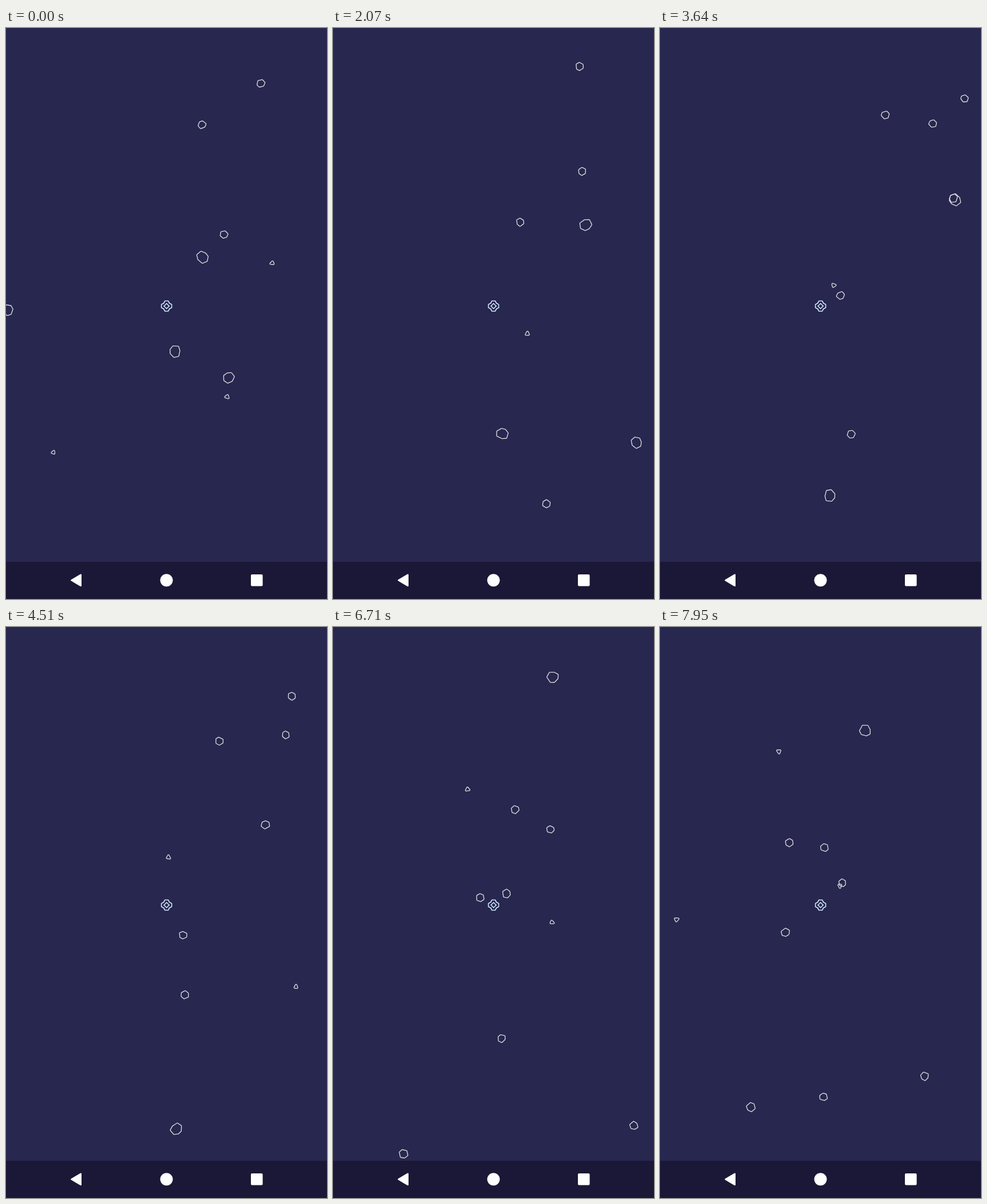
Write an HTML page with a canvas that moves like this. It is 561 px wide and 998 px high and loops after 8 s.

```html
<!DOCTYPE html>
<html lang="en">
<head>
<meta charset="utf-8">
<title>Drifting rocks</title>
<style>
  html, body { margin: 0; width: 100%; height: 100%; overflow: hidden; background: #27274f; }
  canvas { display: block; width: 561px; height: 998px; }
</style>
</head>
<body>
<canvas id="stage" width="561" height="998"></canvas>
<script>
const ctx = document.getElementById('stage').getContext('2d');
const LOOP = 8000, FLOOR = 933, RIGHT = 551, BOTTOM = 922.5;
const SPIN = 50 * Math.PI / 180, HEADING = Math.PI / 4;

let seed = 7;
const random = () => (seed = seed * 16807 % 2147483647) / 2147483647;
const spread = amount => (random() * 2 - 1) * amount;

// Each rock drifts straight from its first point to its last during one loop.
const rocks = [];
function addRocks(radius, corners, paths) {
  for (const [from, to] of paths) {
    const outline = Array.from({ length: corners }, (_, i) => {
      const angle = (i + spread(.15)) / corners * 2 * Math.PI;
      const r = radius * (1 + spread(.14));
      return [r * Math.cos(angle), r * Math.sin(angle)];
    });
    rocks.push({ from, to, outline });
  }
}

addRocks(5.4, 3, [
  [[464, 411], [1080, 275]], [[386, 645], [206, 215]], [[83, 741], [-341, 1339]],
  [[758, 856], [312, 451]], [[-440, 511], [32, 511]]
]);
addRocks(7.3, 6, [
  [[445, 97], [683, -343]], [[342, 169], [285, 825]], [[381, 361], [591, -65]],
  [[425, 992], [225, 373]], [[482, -44], [287, 388]], [[760, 97], [216, 537]],
  [[713, -151], [316, 451]], [[-68, 1364], [160, 836]], [[870, 1337], [460, 782]]
]);
addRocks(9.9, 7, [
  [[343, 401], [723, 179]], [[3, 493], [-317, 493]], [[295, 565], [300, 1120]],
  [[389, 611], [935, 1049]], [[523, -421], [358, 185]]
]);

const mix = (a, b, k) => a + (b - a) * k;

function roundedPath(points, radius) {
  const middle = i => {
    const [a, b] = [points[i % points.length], points[(i + 1) % points.length]];
    return [mix(a[0], b[0], .5), mix(a[1], b[1], .5)];
  };
  ctx.beginPath();
  ctx.moveTo(...middle(points.length - 1));
  points.forEach((point, i) => ctx.arcTo(...point, ...middle(i), radius));
  ctx.closePath();
}

function placed(x, y, turn, draw) {
  ctx.save();
  ctx.translate(x, y);
  ctx.rotate(turn);
  draw();
  ctx.restore();
}

function strokeShape(points, radius) {
  roundedPath(points, radius);
  ctx.stroke();
}

function drawRocks(progress) {
  ctx.strokeStyle = '#dcdce0';
  ctx.lineWidth = 1.35;
  const turn = HEADING + SPIN * progress * LOOP / 1000;
  for (const { from, to, outline } of rocks) {
    const x = mix(from[0], to[0], progress), y = mix(from[1], to[1], progress);
    if (x < RIGHT && y < BOTTOM) placed(x, y, turn, () => strokeShape(outline, 1.4));
  }
}

function drawShip() {
  ctx.strokeStyle = '#d0e4f8';
  ctx.lineWidth = 1.6;
  for (let quarter = 0; quarter < 4; quarter++) {
    placed(280.6, 486, quarter * Math.PI / 2, () => {
      ctx.beginPath();
      ctx.moveTo(5, -5);
      ctx.lineTo(9, -2.8);
      ctx.lineTo(9, 2.8);
      ctx.lineTo(5, 5);
      ctx.moveTo(0, -4.5);
      ctx.lineTo(4.5, 0);
      ctx.stroke();
    });
  }
}

function drawNavigation() {
  ctx.fillStyle = '#1a1836';
  ctx.fillRect(0, FLOOR, 561, 65);
  ctx.fillStyle = '#fff';
  roundedPath([[112, 965.3], [132, 953.5], [132, 977]], 1.2);
  ctx.fill();
  ctx.beginPath();
  ctx.arc(280.5, 965.3, 11, 0, 7);
  ctx.fill();
  ctx.beginPath();
  ctx.roundRect(428, 955, 20.6, 20.6, 2);
  ctx.fill();
}

function frame() {
  ctx.fillStyle = '#27274f';
  ctx.fillRect(0, 0, 561, 998);
  ctx.lineJoin = ctx.lineCap = 'round';
  drawRocks(performance.now() % LOOP / LOOP);
  drawShip();
  drawNavigation();
  requestAnimationFrame(frame);
}
frame();
</script>
</body>
</html>
```
